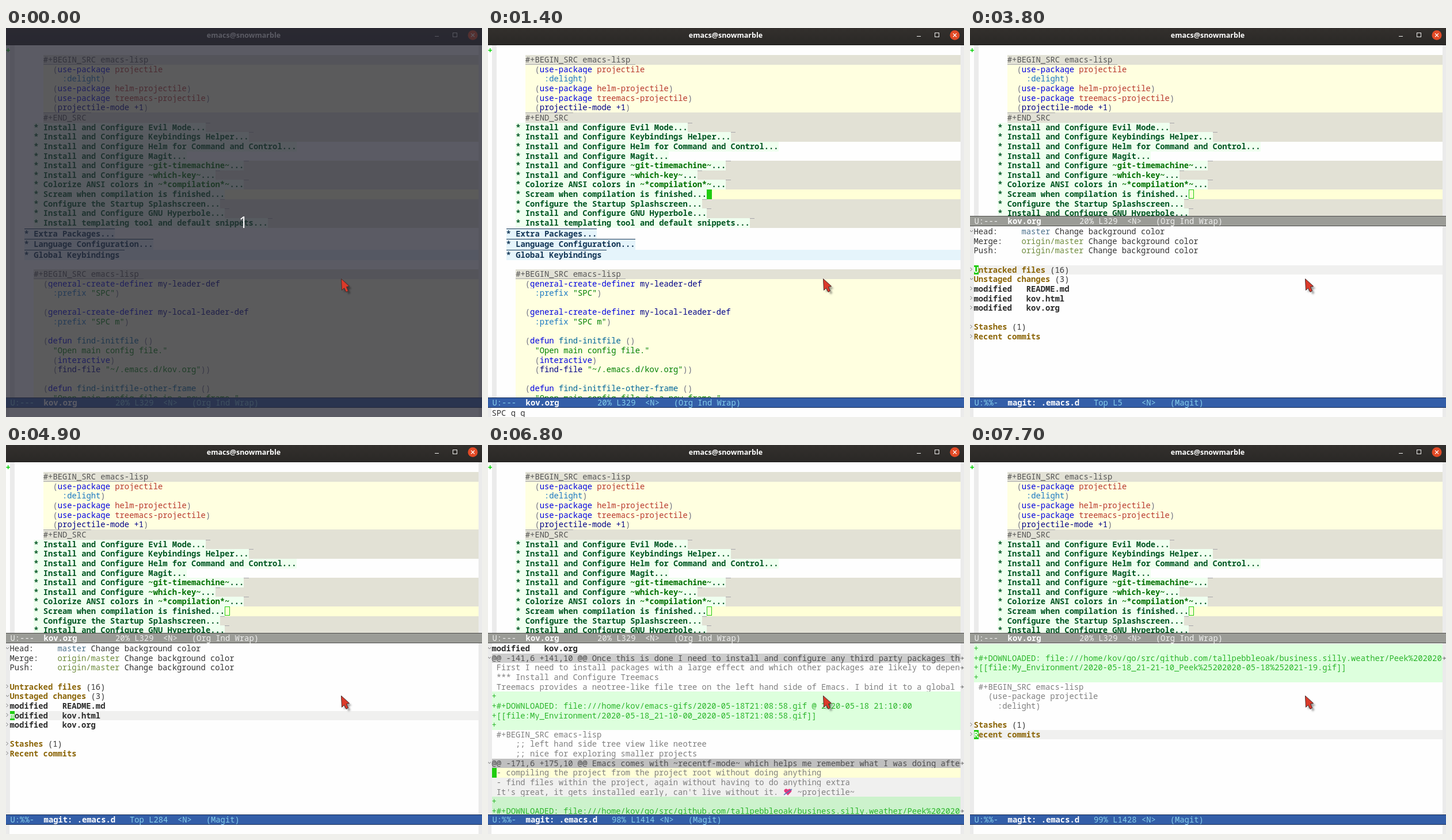
Animation of 827 by 677 pixels, one loop 8 s. Source, as an HTML page with a canvas:

```html
<!DOCTYPE html>
<html lang="en">
<head>
<meta charset="utf-8">
<title>Editor session</title>
<style>
html, body { margin: 0; width: 100%; height: 100%; overflow: hidden; background: #fff; }
canvas { display: block; }
</style>
</head>
<body>
<canvas id="stage" width="827" height="677"></canvas>
<script>
const ctx = document.getElementById('stage').getContext('2d');
const LOOP = 8000, WIDTH = 827, HEIGHT = 677;
const CHAR = 8.298, LINE = 16.62, RIGHT = 821, COLUMNS = 98;
const MONO = '13.83px "Noto Sans Mono", "DejaVu Sans Mono", monospace';
const GREEN = '#1fcc0f', FRINGE = '#ebebeb', BLOCK_EDGE = '#e2e1d5', HL_LINE = '#ffffd7';

// Inline markup {xtext}: x picks one of these styles.
const STYLES = {
  p: ['#707183'], k: ['#0000e0'], c: ['#b8382c'], b: ['#1a78c2'], n: ['#000088'],
  s: ['#008000'], f: ['#006699'], v: ['#006f00', true], g: ['#8b6508', true],
  m: ['#4a708b'], o: ['#6e8b3d'], w: ['#ffffff', true], d: ['#2b2b2b', true]
};

const plain = s => s.replace(/\{.([^}]*)\}/g, '$1');

function rect(x, y, right, bottom, color) {
  ctx.fillStyle = color;
  x = Math.round(x); y = Math.round(y);
  ctx.fillRect(x, y, Math.round(right) - x, Math.round(bottom) - y);
}

function write(text, x, baseline, color, bold = false) {
  for (const part of text.split(/(\{.[^}]*\})/)) {
    const marked = part[0] === '{';
    const [ink, heavy] = marked ? STYLES[part[1]] : [color, bold];
    ctx.fillStyle = ink;
    ctx.font = (heavy ? 'bold ' : '') + MONO;
    for (const ch of marked ? part.slice(2, -1) : part) {
      ctx.fillText(ch, x, baseline);
      x += CHAR;
    }
  }
}

function clipped(x, y, right, bottom, draw) {
  ctx.save();
  ctx.beginPath();
  ctx.rect(x, y, right - x, bottom - y);
  ctx.clip();
  draw();
  ctx.restore();
}

function stroke(color, width, ...points) {
  ctx.strokeStyle = color;
  ctx.lineWidth = width;
  ctx.beginPath();
  points.forEach(([x, y]) => ctx.lineTo(x, y));
  ctx.stroke();
}

// [kind, column, text, extra space above]
// kinds: begin/end of block, code, heading (plain, grey or current tail), top heading
const ORG = [
  ['', 0, ''],
  ['begin', 6, '#+BEGIN_SRC emacs-lisp'],
  ['code', 6, '  {p(}{kuse-package} {cprojectile}'],
  ['code', 6, '    {b:delight}{p)}'],
  ['code', 6, '  {p(}{kuse-package} {chelm-projectile}{p)}'],
  ['code', 6, '  {p(}{kuse-package} {ctreemacs-projectile}{p)}'],
  ['code', 6, '  {p(}{nprojectile-mode +1}{p)}'],
  ['end', 6, '#+END_SRC', 1.2],
  ['grey', 4, '* Install and Configure Evil Mode...'],
  ['grey', 4, '* Install and Configure Keybindings Helper...'],
  ['plain', 4, '* Install and Configure Helm for Command and Control...'],
  ['plain', 4, '* Install and Configure Magit...'],
  ['grey', 4, '* Install and Configure {v~git-timemachine~}...'],
  ['grey', 4, '* Install and Configure {v~which-key~}...'],
  ['grey', 4, '* Colorize ANSI colors in {v~*compilation*~}...'],
  ['current', 4, '* Scream when compilation is finished...'],
  ['grey', 4, '* Configure the Startup Splashscreen...'],
  ['grey', 4, '* Install and Configure GNU Hyperbole...'],
  ['grey', 4, '* Install templating tool and default snippets...'],
  ['top', 2, '* Extra Packages...', 2],
  ['top', 2, '* Language Configuration...', 2],
  ['topOpen', 2, '* Global Keybindings', 1.9],
  ['', 0, ''],
  ['begin', 4, '#+BEGIN_SRC emacs-lisp'],
  ['code', 4, '  {p(}{kgeneral-create-definer} {nmy-leader-def}'],
  ['code', 4, '    {b:prefix} {s"SPC"}{p)}'],
  ['code', 4, ''],
  ['code', 4, '  {p(}{kgeneral-create-definer} {nmy-local-leader-def}'],
  ['code', 4, '    {b:prefix} {s"SPC m"}{p)}'],
  ['code', 4, ''],
  ['code', 4, '  {p(}{kdefun} {ffind-initfile} {p()}'],
  ['code', 4, '    {s"Open main config file."}'],
  ['code', 4, '    {p(}{kinteractive}{p)}'],
  ['code', 4, '    {p(}{nfind-file} {s"~/.emacs.d/kov.org"}{p))}'],
  ['code', 4, ''],
  ['code', 4, '  {p(}{kdefun} {ffind-initfile-other-frame} {p()}'],
  ['code', 4, '    {s"Open main config file in a new frame."}']
];

function orgRow([kind, col, text, extra = 0], top) {
  const x = 15 + col * CHAR, end = x + plain(text).length * CHAR;
  const bottom = top + LINE + extra, baseline = bottom - LINE / 2 + 4.7;
  let color = '#555555', bold = false;
  if (kind === 'begin' || kind === 'end') {
    rect(x, top, RIGHT, bottom, BLOCK_EDGE);
    const y = Math.round(kind === 'end' ? top : bottom - 1);
    rect(x, y, end + CHAR, y + 1, '#a7a6aa');
  } else if (kind === 'code') {
    rect(x, top, RIGHT, bottom, '#ffffe0');
  } else if (kind.startsWith('top')) {
    [color, bold] = ['#123555', true];
    const open = kind === 'topOpen', y = Math.round(top + 1);
    rect(x, top + 1, open ? RIGHT : end, bottom + 1, '#e5f4fb');
    rect(x, y, open ? end + CHAR : end, y + 1, color);
  } else if (kind) {
    [color, bold] = ['#005522', true];
    if (kind !== 'plain') rect(end, top, RIGHT, bottom, kind === 'grey' ? BLOCK_EDGE : HL_LINE);
    rect(x, top, end, bottom, '#efffef');
    if (kind === 'grey') rect(end, Math.round(top), end + CHAR, Math.round(top) + 1, '#a7a6aa');
  }
  write(text, x, baseline, color, bold);
  return bottom;
}

function orgWindow(bottom, active, cursorOn) {
  clipped(0, 30, WIDTH, bottom, () => {
    rect(0, 30, WIDTH, bottom, '#fefefe');
    let top = 30.6;
    for (const row of ORG) top = orgRow(row, top);
    rect(7, 30, 15, bottom, FRINGE);
    rect(RIGHT, 30, WIDTH, bottom, FRINGE);
    write('+', -0.5, 43.5, '#00d000', true);
    if (!active) {
      ctx.strokeStyle = GREEN;
      ctx.lineWidth = 1;
      ctx.strokeRect(380.5, 281.5, 8, 15);
    } else if (cursorOn) {
      rect(380, 281, 389, 298, GREEN);
    }
  });
  modeLine(bottom, active, 'U:---  {wkov.org}        20% L329  <N>   (Org Ind Wrap)');
}

function modeLine(top, active, text) {
  rect(0, top, WIDTH, top + 18, active ? '#1a2f54' : '#4e4e4c');
  rect(0, top + 1, WIDTH, top + 17, active ? '#335ea8' : '#9b9c97');
  write(text, 7.5, top + 14, active ? '#85ceeb' : '#f0f0ef');
}

// Magit lines: [kind, text]; "v" and ">" are fold marks, "@" a hunk header,
// "+" an added line, "c" a context line.
const HOME = 'file:' + '/'.repeat(3) + 'home/kov';
const HEAD = [
  ['v', 'Head:     {mmaster} Change background color'],
  ['', 'Merge:    {oorigin/master} Change background color'],
  ['', 'Push:     {oorigin/master} Change background color'],
  ['', '']
];
const UNTRACKED = '{gUntracked files} (16)';
const FILES = [
  ...['07-36_Peek%202020-05-18%2021-06', '09-52_2020-05-18T21:08:58', '10-00_2020-05-18T21:08:58',
    '16-11_2020-05-18T21:15:45', '19-40_Peek%202020-05-18%2021-06', '21-10_Peek%202020-05-18%2021-19']
    .map(name => 'My_Environment/2020-05-18_21-' + name + '.gif'),
  ...['3.vrb', 'aux', 'bash', 'log', 'nav', 'out', 'sh'].map(ext => 'kov.' + ext)
].map(name => ['', name]);
const DIFF = [
  ['@', '@@ -141,6 +141,10 @@ Once this is done I need to install and configure any third party packages that'],
  ['c', ' First I need to install packages with a large effect and which other packages are likely to depend'],
  ['c', ' *** Install and Configure Treemacs'],
  ['c', ' Treemacs provides a neotree-like file tree on the left hand side of Emacs. I bind it to a global key'],
  ['+', '+'],
  ['+', '+#+DOWNLOADED: ' + HOME + '/emacs-gifs/2020-05-18T21:08:58.gif @ 2020-05-18 21:10:00'],
  ['+', '+[[file:My_Environment/2020-05-18_21-10-00_2020-05-18T21:08:58.gif]]'],
  ['+', '+'],
  ['c', ' #+BEGIN_SRC emacs-lisp'],
  ['c', '     ;; left hand side tree view like neotree'],
  ['c', '     ;; nice for exploring smaller projects'],
  ['@', '@@ -171,6 +175,10 @@ Emacs comes with ~recentf-mode~ which helps me remember what I was doing after'],
  ['c', ' - compiling the project from the project root without doing anything'],
  ['c', ' - find files within the project, again without having to do anything extra'],
  ['c', " It's great, it gets installed early, can't live without it.    ~projectile~"],
  ['+', '+'],
  ['+', '+#+DOWNLOADED: ' + HOME + '/go/src/github.com/tallpebbleoak/business.silly.weather/Peek%202020-05-18'],
  ['+', '+[[file:My_Environment/2020-05-18_21-21-10_Peek%25202020-05-18%252021-19.gif]]'],
  ['+', '+'],
  ['c', ' #+BEGIN_SRC emacs-lisp'],
  ['c', '   (use-package projectile'],
  ['c', '     :delight)']
];

function magitLines(t) {
  if (t < 2800) return [...HEAD, ['v', UNTRACKED], ...FILES];
  const expanded = t >= 5300;
  return [
    ...HEAD, ['>', UNTRACKED], ['v', '{gUnstaged changes} (3)'],
    ['>', '{dmodified   README.md}'], ['>', '{dmodified   kov.html}'],
    [expanded ? 'v' : '>', '{dmodified   kov.org}'],
    ...(expanded ? DIFF : []),
    ['', ''], ['>', '{gStashes} (1)'], ['>', '{gRecent commits}'], ['', '']
  ];
}

function cursorLine(t) {
  if (t >= 7700) return 33;
  if (t >= 6500) return Math.min(34, Math.floor(14 + 3.75 * (Math.floor(t / 100) - 66)));
  return 4 + [4000, 4100, 4900, 5300, 6000].filter(start => t >= start).length;
}

function bufferLine(line) {
  if (line < 8) return [5, 23, 24, 284][line - 4];
  return line + (line > 32 ? 1395 : 1393);
}

// First and last line of the section that is lit up around the cursor.
function litSection(line, t) {
  if (line === 4) return [4, t < 2800 ? 17 : 4];
  if (line === 5) return [5, 8];
  if (line === 8) return [8, 30];
  if (line >= 9 && line <= 30) return line < 20 ? [9, 19] : [20, 30];
  return [line, line];
}

function magitColors(kind, lit, current) {
  if (kind === '@') return [lit ? '#bfbfbf' : '#cccccc', '#4d4d4d'];
  const colors = kind === '+' ? [lit ? '#ccf2cc' : '#ddffdd', '#2bb52b']
    : [lit ? '#f0f0ef' : '', kind === 'c' ? '#7f7f7f' : '#333333'];
  if (current && kind !== 'v' && kind !== '>') colors[0] = HL_LINE;
  return colors;
}

function heart(x, y) {
  ctx.fillStyle = '#e5397f';
  ctx.beginPath();
  ctx.arc(x - 3, y - 2, 3.4, Math.PI * 0.8, 0);
  ctx.arc(x + 3, y - 2, 3.4, Math.PI, Math.PI * 0.2);
  ctx.lineTo(x, y + 6);
  ctx.fill();
  stroke('#4a78b8', 1.5, [x - 7, y + 5], [x + 7, y - 5]);
}

function foldMark(kind, y) {
  if (kind === '>') stroke('#777', 1, [0.5, y - 4], [3.5, y - 1], [0.5, y + 2]);
  else if (kind === 'v' || kind === '@') stroke('#777', 1, [0, y - 2.5], [2.5, y + 0.5], [5, y - 2.5]);
}

function magitWindow(t, cursorOn) {
  const cursor = cursorLine(t), [first, last] = litSection(cursor, t);
  const scroll = Math.max(0, Math.floor((cursor - 9) / 8) * 8);
  clipped(0, 345, WIDTH, 643, () => {
    rect(0, 345, WIDTH, 643, '#fefefe');
    rect(0, 345, 7, 643, FRINGE);
    rect(RIGHT, 345, WIDTH, 643, FRINGE);
    magitLines(t).slice(scroll, scroll + 18).forEach(([kind, text], row) => {
      const line = scroll + row, y = 354.5 + row * LINE;
      const top = y - LINE / 2, bottom = y + LINE / 2, baseline = y + 4.7;
      const [back, ink] = magitColors(kind, line >= first && line <= last, line === cursor);
      if (back) rect(7, top, RIGHT, bottom, back);
      const long = kind && '@c+'.includes(kind) && text.length > COLUMNS;
      write(long ? text.slice(0, COLUMNS) : text, 6.5, baseline, ink);
      foldMark(kind, y);
      if (text.includes('live without')) heart(521, y);
      if (long) {
        stroke('#666', 1, [821, y], [826, y]);
        stroke('#666', 1, [823, y - 2.5], [826, y], [823, y + 2.5]);
      }
      if (line === cursor && cursorOn) {
        rect(6.5, top, 15, bottom, GREEN);
        write(plain(text).slice(0, 1), 6.5, baseline, '#ffffff', text.startsWith('{'));
      }
    });
  });
  const place = ['Top', '98%', '99%', '99%'][scroll / 8];
  const where = ('L' + bufferLine(cursor)).padEnd(6);
  modeLine(643, true, `U:%%-  {wmagit: .emacs.d}   ${place} ${where}<N>   (Magit)`);
}

function centered(text, x, y, font) {
  ctx.font = font;
  ctx.fillStyle = '#ffffff';
  ctx.textAlign = 'center';
  ctx.fillText(text, x, y);
  ctx.textAlign = 'left';
}

function titleBar() {
  const shade = ctx.createLinearGradient(0, 0, 0, 29);
  shade.addColorStop(0, '#33302d');
  shade.addColorStop(1, '#2a2826');
  ctx.fillStyle = shade;
  ctx.fillRect(0, 0, WIDTH, 29);
  rect(0, 29, WIDTH, 30, '#1c1b19');
  centered('emacs@snowmarble', 413, 17, 'bold 12.5px "Noto Sans", "Open Sans", sans-serif');
  rect(745, 14, 752, 15, '#f0f0ee');
  ctx.strokeStyle = '#f0f0ee';
  ctx.lineWidth = 1;
  ctx.strokeRect(776.5, 8.5, 7, 7);
  ctx.fillStyle = '#e24a26';
  ctx.beginPath();
  ctx.arc(811, 12.5, 8.5, 0, Math.PI * 2);
  ctx.fill();
  stroke('#fff', 1.1, [808, 9.5], [814, 15.5]);
  stroke('#fff', 1.1, [814, 9.5], [808, 15.5]);
}

function pointer() {
  const arrow = new Path2D('M582.5 436.5 L583.5 456.5 L587.5 452.5 L591 459.5 L594.5 457.5 L591.5 450.5 L596.5 449.5 Z');
  ctx.save();
  ctx.shadowColor = 'rgba(0,0,0,.35)';
  ctx.shadowBlur = 3;
  ctx.shadowOffsetX = ctx.shadowOffsetY = 4;
  ctx.fillStyle = '#dc3a2a';
  ctx.fill(arrow);
  ctx.restore();
  ctx.strokeStyle = '#4a2a2a';
  ctx.lineWidth = 1;
  ctx.stroke(arrow);
}

const BLINK_OFF = [[0, 300], [800, 1200], [2100, 2600], [3300, 3800], [5800, 6000]];

function echoText(t) {
  if (t < 1200 || t >= 2800) return '';
  return t < 1300 ? 'SPC' : t < 1400 ? 'SPC g' : 'SPC g g';
}

function render(t) {
  const cursorOn = !BLINK_OFF.some(([from, to]) => t >= from && t < to);
  const split = t >= 1600;
  rect(0, 0, WIDTH, HEIGHT, '#fefefe');
  titleBar();
  orgWindow(split ? 327 : 643, !split, cursorOn);
  if (split) magitWindow(t, cursorOn);
  rect(0, 661, 6, HEIGHT, FRINGE);
  rect(RIGHT, 661, WIDTH, HEIGHT, FRINGE);
  write(echoText(t), 6.5, 675, '#333333');
  if (t < 100) {
    rect(0, 0, WIDTH, HEIGHT, 'rgba(40,40,52,.76)');
    centered('1', 412.5, 348, '27px "Open Sans", "Noto Sans", sans-serif');
  }
  pointer();
}

function tick() {
  render(performance.now() % LOOP);
  requestAnimationFrame(tick);
}
tick();
</script>
</body>
</html>
```
